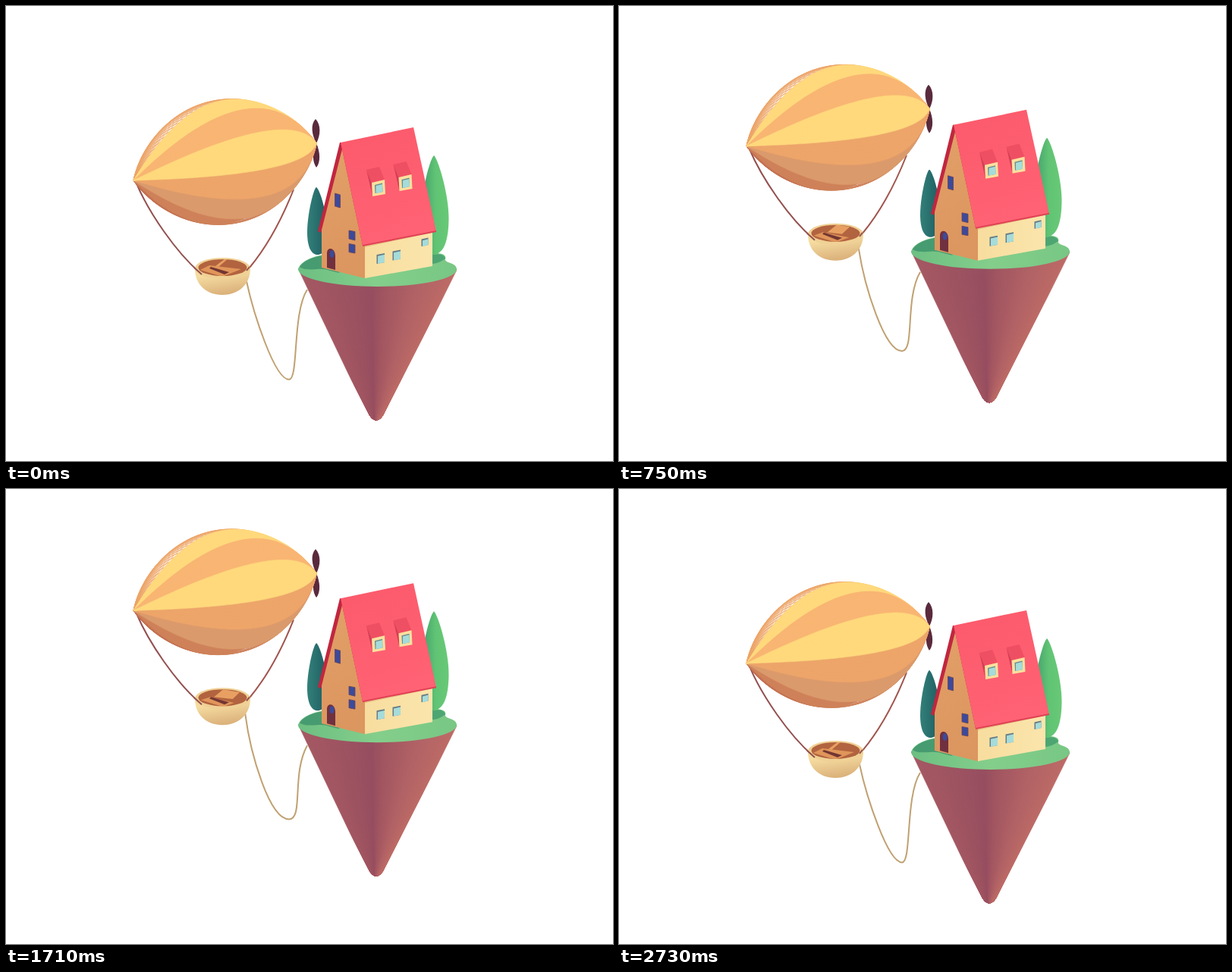
Recreate the animation shown at these times as an HTML page. Size 800x600 px, loop 2760 ms.

```html
<!DOCTYPE html>
<html lang="en">
<head>
<meta charset="utf-8">
<title>Airship and floating house</title>
<style>
  html, body { margin: 0; width: 100%; height: 100%; overflow: hidden; background: #fff; }
  svg { display: block; width: 800px; height: 600px; }
</style>
</head>
<body>
<svg viewBox="0 0 800 600">
  <defs>
    <linearGradient id="tipShade">
      <stop offset="0" stop-color="#e08a4c" stop-opacity=".35"/>
      <stop offset=".4" stop-color="#e08a4c" stop-opacity="0"/>
    </linearGradient>
    <linearGradient id="bowl" x2=".3" y2="1">
      <stop offset=".3" stop-color="#f5dca0"/><stop offset="1" stop-color="#dcb37c"/>
    </linearGradient>
    <linearGradient id="treeLight">
      <stop offset="0" stop-color="#3f9a6c"/><stop offset=".55" stop-color="#60c474"/><stop offset="1" stop-color="#68c977"/>
    </linearGradient>
    <linearGradient id="treeDark">
      <stop offset="0" stop-color="#33807a"/><stop offset=".8" stop-color="#226466"/>
    </linearGradient>
    <linearGradient id="gable" x2=".2" y2="1">
      <stop offset="0" stop-color="#e2a068"/><stop offset="1" stop-color="#dc965f"/>
    </linearGradient>
    <linearGradient id="wall">
      <stop offset="0" stop-color="#f7dd9e"/><stop offset="1" stop-color="#fbe5ac"/>
    </linearGradient>
    <linearGradient id="roof" x2=".3" y2="1">
      <stop offset="0" stop-color="#fb5a6b"/><stop offset="1" stop-color="#ff6274"/>
    </linearGradient>
    <linearGradient id="grass">
      <stop offset="0" stop-color="#6cbf82"/><stop offset=".5" stop-color="#84ce8b"/><stop offset="1" stop-color="#78c784"/>
    </linearGradient>
    <clipPath id="coneShape">
      <path d="M385 346 L386 351 Q398 384 432 450 L479 540 Q488 553 497 540 L560 417 Q583 375 594 351 L594 346 Z"/>
    </clipPath>
    <clipPath id="opening"><ellipse cx="285.5" cy="345" rx="32" ry="11"/></clipPath>
    <g id="dormer">
      <path fill="#d23f55" d="M475 216 L482 233 L483 251 Z"/>
      <path fill="#ef4f62" d="M475 216 L492 212 L499 229 L482 233 Z"/>
      <path fill="#fae09e" d="M482 233 L499 229 L500 248 L483 251 Z"/>
      <path fill="#6c8c90" d="M486 236 L496 233.500 L496.500 245 L486.500 247 Z"/>
      <path fill="#a5dcda" d="M487.500 237 L496 235 L496.500 245 L487.500 247 Z"/>
    </g>
  </defs>

  <path id="tether" fill="none" stroke="#c0a172" stroke-width="2"/>

  <g id="airship">
    <g fill="none" stroke-width="2">
      <path stroke="#93504f" d="M172 234 C188 272 224 325 257 353"/>
      <path stroke="#a0554e" d="M379 242 C364 280 345 316 321 345"/>
    </g>
    <g fill="#5a2a3c">
      <path d="M409 181 C403 170 401 156 408 149 C415 156 415 170 409 181"/>
      <path d="M409 181 C403 193 404 206 409 213 C415 206 414 192 409 181"/>
    </g>
    <g id="envelope"></g>
    <path fill="url(#bowl)" d="M249 346 C249 370 267 381 285.500 381 S322 369 322 346 Z"/>
    <ellipse cx="285.500" cy="346" rx="36.500" ry="14" fill="#f0d195"/>
    <ellipse cx="285.500" cy="345" rx="32" ry="11" fill="#b2633f"/>
    <g clip-path="url(#opening)">
      <path id="floor" fill="#e0955a"/>
      <path fill="#733632" d="M270 344 L294 351 L288 354 L268 346 Z"/>
      <path id="bench" fill="#e8a062"/>
    </g>
    <path fill="none" stroke="#93504f" stroke-width="2" d="M248 345 L258 354 M321 344 L317 349"/>
  </g>

  <g id="island">
    <g id="cone" clip-path="url(#coneShape)"></g>
    <path fill="url(#grass)" d="M385 347 C388 337 402 331 418 328 L560 326 C574 325 581 328 579 334 C578 339 594 338 594 347 A104.500 23 0 0 1 385 347 Z"/>
    <path fill="#479b70" d="M387 344 C394 334 406 331 418 329 L440 352 C426 350 424 346 410 347 C398 348 390 347 387 344 Z"/>
    <path fill="#4da572" d="M561 328 Q577 325 579 333 Q570 340 561 340 Z"/>

    <path fill="url(#treeLight)" d="M564 197 C570 203 584 250 583.500 282 C583 310 577 327 563 328 C548 325 544 305 546 274 C548 245 558 203 564 197 Z"/>
    <path fill="url(#treeDark)" d="M409 239 C413 241 423 270 423 298 C423 318 420 328 410 328 C400 327 397 313 397 298 C397 276 405 241 409 239 Z"/>

    <path fill="url(#gable)" d="M442 184 L416 288 L416 345 L473 359 L475 312 Z"/>
    <path fill="url(#wall)" d="M473 313 L562 294 L562 343 L473 359 Z"/>
    <path fill="#e6c083" d="M473 316 L562 297 L562 299 L473 318 Z"/>
    <path fill="#c1263f" d="M440 180 L411 297 L415 299 L443 189 L470 316 L473 312 L444 180 Z"/>
    <path fill="url(#roof)" d="M441 180 L537 160 L567 297 L470 316 Z"/>
    <path fill="#e04155" d="M567 296 L567 298 L470 317 L470 315 Z"/>
    <use href="#dormer"/>
    <use href="#dormer" x="35.500" y="-7"/>

    <g fill="#3c4a9b" stroke="#654259" stroke-width=".8">
      <path d="M433.500 247 L440.500 249 L440.500 266 L433.500 264 Z"/>
      <path d="M452 296 L460 297.500 L460 309 L452 307 Z"/>
      <path d="M452 313.500 L460 315 L460 326 L452 324.500 Z"/>
    </g>
    <path fill="#70303f" d="M423 345 L423 326 C423 317 434 318 434 330 L434 348 Z"/>
    <ellipse cx="429.500" cy="327" rx="3" ry="5" fill="#3c4a9b"/>
    <g id="windows"></g>
  </g>
</svg>
<script>
  const $ = id => document.getElementById(id);
  const mix = (a, b, k) => a + (b - a) * k;
  const polygon = points => 'M' + points.map(p => p.map(v => v.toFixed(2)).join(' ')).join('L') + 'Z';

  function add(parent, d, fill, stroke = 'none') {
    const path = document.createElementNS('http://www.w3.org/2000/svg', 'path');
    path.setAttribute('d', d);
    path.setAttribute('fill', fill);
    path.setAttribute('stroke', stroke);
    path.setAttribute('stroke-width', .6);
    $(parent).append(path);
  }

  // The envelope is a spindle whose left tip leans towards the viewer;
  // its stripes lie between meridians, counted from the front.
  function spindlePoint(u, degrees) {
    const angle = degrees * Math.PI / 180;
    const profile = 1 - u * u;
    const along = 123 * u + 52 * profile * Math.cos(angle);
    const down = 82 * profile * Math.sin(angle);
    return [288.7 + 0.98 * along + 0.199 * down, 205.5 - 0.199 * along + 0.98 * down];
  }

  // Thin slices keep each stripe's curved outline filled.
  function stripe(from, to) {
    const steps = Array.from({ length: 61 }, (_, i) => i / 30 - 1);
    const slices = Math.ceil((to - from) / 4);
    let d = '';
    for (let i = 0; i < slices; i++) {
      const a = mix(from, to, i / slices), b = mix(from, to, (i + 1) / slices);
      d += polygon([
        ...steps.map(u => spindlePoint(u, a)),
        ...steps.map(u => spindlePoint(-u, b))
      ]);
    }
    return d;
  }

  const stripes = [
    [-180, -78, '#eda569'], [102, 180, '#c5714f'],
    [72, 102, '#cf8259'], [-78, -50, '#ffd97c'],
    [42, 72, '#db9a6c'], [-50, -21, '#f9b573'],
    [14, 42, '#eda56a'], [-21, 14, '#ffd97c']
  ];
  for (const [from, to, color] of stripes) add('envelope', stripe(from, to), color, color);
  add('envelope', stripe(-180, 180), 'url(#tipShade)');

  // Cone shading runs in wedges from the rim to the tip.
  const shades = [[0, 164, 88, 98], [.3, 156, 82, 97], [.46, 150, 78, 96],
                  [.56, 162, 86, 97], [.8, 178, 99, 102], [1, 188, 106, 102]];
  function coneColor(k) {
    const i = shades.findIndex((s, n) => n && k <= s[0]);
    const [a, b] = [shades[i - 1], shades[i]];
    const part = (k - a[0]) / (b[0] - a[0]);
    return `rgb(${[1, 2, 3].map(c => Math.round(mix(a[c], b[c], part)))})`;
  }
  for (let i = 0; i < 60; i++) {
    const x = 382 + i * 3.6, color = coneColor((i + .5) / 60);
    add('cone', `M${x} 340H${x + 3.6}L490 558H486Z`, color, color);
  }

  for (const [x, y, w, h] of [[488.5, 328, 10.5, 12], [509.5, 323.5, 10.5, 12], [547.5, 307.5, 9, 9.5]]) {
    const pane = (dx, dy) => polygon([[x + dx, y + dy], [x + w, y + dy - 2], [x + w, y + h - 2], [x + dx, y + h]]);
    add('windows', pane(0, 0), '#667d86');
    add('windows', pane(1.5, 1.8), '#a5dcda');
  }

  const half = 1380, frame = 30, ease = .53;
  function easeInOut(x) {
    let lo = 0, hi = 1, s;
    for (let i = 0; i < 24; i++) {
      s = (lo + hi) / 2;
      const at = 3 * ease * s * (1 - s) ** 2 + 3 * (1 - ease) * s * s * (1 - s) + s ** 3;
      if (at < x) lo = s; else hi = s;
    }
    return s * s * (3 - 2 * s);
  }

  const morph = (from, to, k) => polygon(from.map((p, i) => p.map((v, j) => mix(v, to[i][j], k))));
  const benchLow = [[276, 343], [289, 333], [293, 333], [280, 344]];
  const benchHigh = [[274, 344], [286, 334], [309, 338], [300, 347]];
  const floorLow = [[256, 348], [268, 342], [310, 347], [285, 357]];
  const floorHigh = [[257, 348], [269, 344], [300, 352], [286, 357]];

  function draw(now) {
    const time = Math.floor(now % (2 * half) / frame) * frame;
    const rise = easeInOut(1 - Math.abs(1 - time / half));
    const shipY = -76.5 * rise, islandY = -39.3 * rise;
    $('airship').setAttribute('transform', `translate(0 ${shipY})`);
    $('island').setAttribute('transform', `translate(0 ${islandY})`);

    const turn = rise ** .7;
    $('bench').setAttribute('d', morph(benchLow, benchHigh, turn));
    $('floor').setAttribute('d', morph(floorLow, floorHigh, turn));

    const startX = 317 - 2 * rise, startY = 363 + shipY + 3 * rise;
    const sagY = 492.5 - 62.5 * rise - 100 * rise * Math.exp(-8 * rise);
    const endY = 374 + islandY;
    $('tether').setAttribute('d',
      `M${startX - 2} ${startY - 8}L${startX} ${startY}` +
      `C${startX + 9 - 2 * rise} ${startY + mix(42, 57, rise)} ${mix(354, 347, rise)} ${sagY} 373 ${sagY}` +
      `C${mix(386, 393, rise)} ${sagY} ${377 - rise} ${endY + mix(31, 38, rise)} 397 ${endY}`);
  }

  let start;
  function tick(now) {
    start ??= now;
    draw(now - start);
    requestAnimationFrame(tick);
  }
  draw(0);
  requestAnimationFrame(tick);
</script>
</body>
</html>
```
